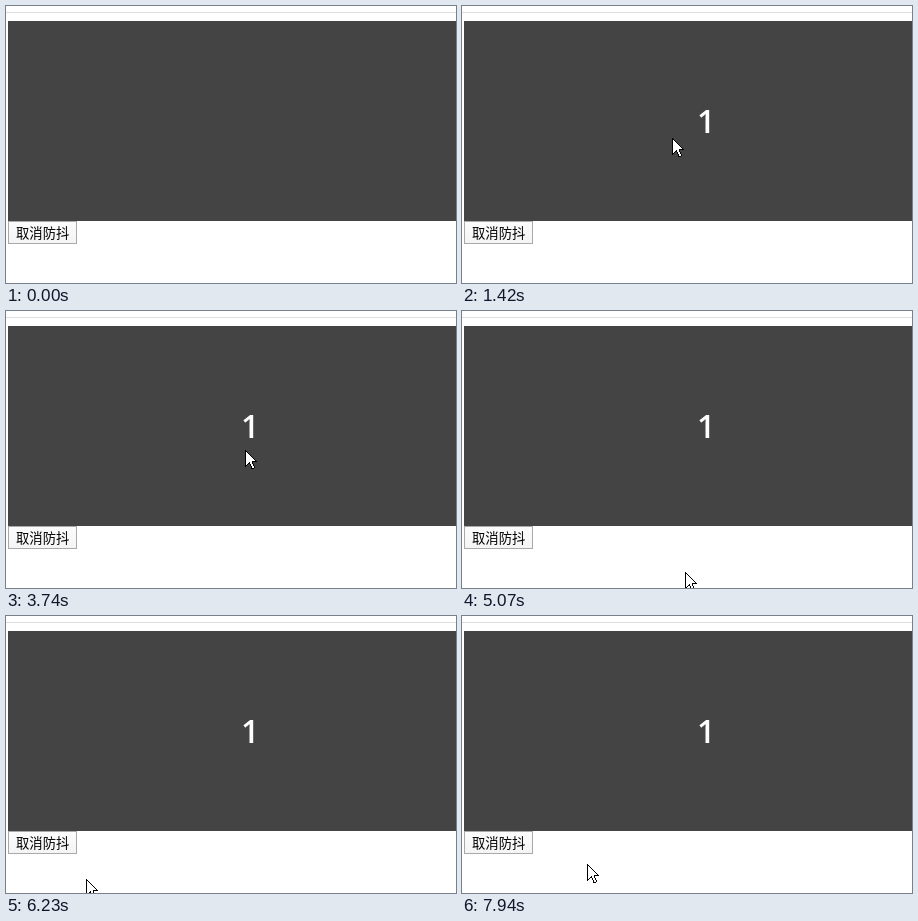
Animation, 450 px wide and 277 px high, one loop 8 s. Source, as an HTML page:

```html
<!DOCTYPE html>
<html lang="zh">
<head>
<meta charset="utf-8">
<style>
  html, body { margin: 0; width: 100%; height: 100%; overflow: hidden; background: #fff; }
  svg { display: block; }
  #count { font: 600 32px "Open Sans", "Noto Sans", sans-serif; fill: #fff; }
  #label { font: 13.333px "Noto Sans CJK SC", "Noto Sans CJK", sans-serif; }
  #button rect { fill: url(#face); stroke: #a9a9a9; }
  #button.hover rect { stroke: #7b7b7b; }
  #button.pressed rect { fill: #e8e8e8; }
</style>
</head>
<body>
<svg width="450" height="277" viewBox="0 0 450 277">
  <defs>
    <linearGradient id="face" x2="0" y2="1">
      <stop stop-color="#fcfcfc"/>
      <stop offset="1" stop-color="#f4f4f4"/>
    </linearGradient>
  </defs>
  <rect y="6" width="450" height="1" fill="#ddd"/>
  <rect x="2" y="15" width="448" height="200" fill="#444"/>
  <text id="count" x="235" y="127">1</text>
  <g id="button">
    <rect x="2.5" y="215.5" width="68" height="22"/>
    <text id="label" x="10" y="231.5">取消防抖</text>
  </g>
  <path id="cursor" fill="#fff" stroke="#000" shape-rendering="crispEdges"
    d="M.5 .5V16.5L4.5 12.5L7 18.5H8.5L9.5 17.5L7.5 12.5V11.5H11.5Z"/>
</svg>
<script>
  const LOOP = 8000, START = 488, STEP = 77.4;
  const FIRST_MOVE = 2, PRESS = 90, RELEASE = 92;

  // Key points of each pointer visit: step, x, y
  const sweepRight = [[0, 100, 264], [10, 170, 77], [12, 210, 132], [18, 255, 278]];
  const upAndDown = [[34, 252, 260], [39, 258, 52], [42, 239, 139], [47, 222, 284]];
  const toButton = [[59, 223, 261], [64, 209, 71], [69, 196, 205], [74, 80, 263],
                    [80, 52, 262], [88, 38, 226], [93, 38, 226], [96, 125, 248]];
  const visits = [sweepRight, upAndDown, toButton];

  const [count, button, cursor] = ["count", "button", "cursor"].map(id => document.getElementById(id));
  const mix = (a, b, k) => Math.round(a + (b - a) * k);

  function pointerAt(step) {
    for (const path of visits) {
      const next = path.findIndex(key => key[0] > step);
      if (next === 0) return null;
      const last = next < 0 ? path.length - 1 : next;
      const [t0, x0, y0] = path[last - 1], [t1, x1, y1] = path[last];
      if (step <= t1) {
        const k = (step - t0) / (t1 - t0);
        return [mix(x0, x1, k), mix(y0, y1, k)];
      }
    }
    return null;
  }

  function draw() {
    const step = Math.floor((performance.now() % LOOP - START) / STEP);
    const point = pointerAt(step);
    cursor.style.display = point ? "" : "none";
    if (point) cursor.setAttribute("transform", `translate(${point})`);
    count.style.display = step >= FIRST_MOVE ? "" : "none";
    const hover = point && point[0] < 71 && point[1] >= 215 && point[1] < 238;
    button.classList.toggle("hover", !!hover);
    button.classList.toggle("pressed", step >= PRESS && step < RELEASE);
    requestAnimationFrame(draw);
  }
  draw();
</script>
</body>
</html>
```
